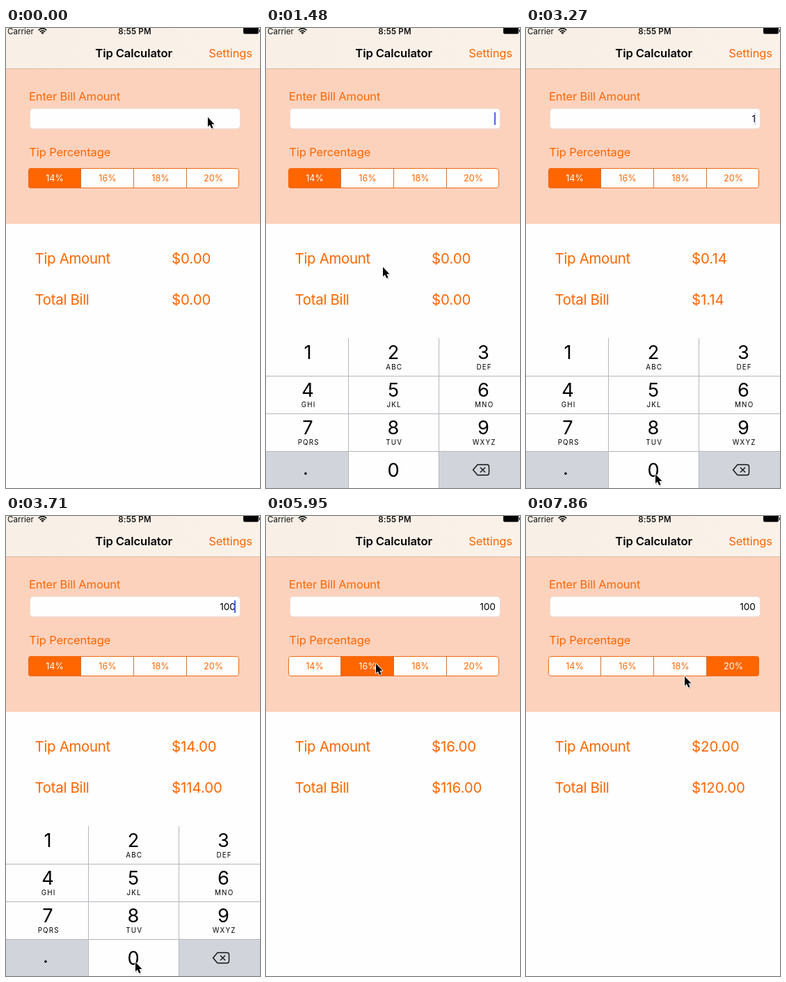
An HTML page for the animation above (8 s loop, 365x660 px).

```html
<!DOCTYPE html>
<html lang="en">
<head>
<meta charset="utf-8">
<title>Tip Calculator</title>
<style>
  html, body { margin: 0; width: 100%; height: 100%; overflow: hidden; background: #fefefe; }
  svg { display: block; }
  text { font-family: Inter, Roboto, sans-serif; white-space: pre; }
  .orange { fill: #ff6600; }
  .status { font-size: 11.6px; fill: #111; }
  .label { font-size: 16.5px; letter-spacing: -.13px; }
  .big { font-size: 20.4px; letter-spacing: -.3px; }
  .amount { font-size: 20.4px; letter-spacing: -.05px; }
  .title { font-size: 16.6px; font-weight: 600; letter-spacing: -.1px; }
  .seg { font-size: 12.6px; }
  .digit { font-size: 27.2px; }
  .abc { font-size: 9.8px; letter-spacing: 1.2px; }
  .mid { text-anchor: middle; }
</style>
</head>
<body>
<svg width="365" height="660" viewBox="0 0 365 660">
  <defs>
    <linearGradient id="bar" x2="1" y2="0">
      <stop offset="0" stop-color="#f8efe7"/>
      <stop offset="1" stop-color="#faf2e9"/>
    </linearGradient>
    <clipPath id="round"><rect x="32" y="201" width="303" height="29" rx="4"/></clipPath>
  </defs>
  <rect width="365" height="660" fill="#fefefe"/>
  <rect y="58" width="365" height="223" fill="#fdd2bd"/>
  <rect width="365" height="58" fill="url(#bar)"/>
  <rect y="58" width="365" height="1" fill="#dfb7a3"/>

  <text class="status" x="2" y="9">Carrier</text>
  <g fill="none" stroke="#111" stroke-width="1.7">
    <path d="M46.6 3.2Q52.5 -2 58.4 3.2M48.7 5.4Q52.5 2.2 56.3 5.4"/>
    <path d="M50.2 6.6Q52.5 5 54.8 6.6L52.5 9Z" fill="#111" stroke="none"/>
  </g>
  <text class="status mid" x="185" y="9" font-weight="600" letter-spacing=".15">8:55 PM</text>
  <path d="M341 0H363V6.5Q363 8.5 361 8.5H343Q341 8.5 341 6.5ZM364 2h1v4h-1Z" fill="#050505"/>

  <text class="title mid" x="183.6" y="42">Tip Calculator</text>
  <text class="label orange" x="291.3" y="42">Settings</text>
  <text class="label orange" x="33" y="103.5">Enter Bill Amount</text>
  <text class="label orange" x="33.3" y="183.5">Tip Percentage</text>

  <rect x="34.5" y="115.5" width="302" height="29" rx="4.5" fill="#fefefe" stroke="#e8dad3"/>
  <text id="bill" x="330" y="134.5" font-size="13.7" text-anchor="end"></text>
  <rect id="caret" x="328" y="121" width="2" height="18" fill="#4a66e6"/>

  <rect x="32" y="201" width="303" height="29" rx="4" fill="#fefefe"/>
  <rect id="pick" y="201" width="76" height="29" class="orange" clip-path="url(#round)"/>
  <rect x="32.5" y="201.5" width="302" height="28" rx="3.5" fill="none" stroke="#f0690f"/>
  <path d="M107.5 201V230M183.5 201V230M259.5 201V230" stroke="#c9743a"/>
  <g id="segs"></g>

  <text class="big orange" x="41.6" y="338">Tip Amount</text>
  <text class="big orange" x="41.6" y="397">Total Bill</text>
  <text id="tip" class="amount orange" x="238" y="338"></text>
  <text id="total" class="amount orange" x="238" y="397"></text>

  <g id="pad">
    <rect y="445" width="365" height="215" fill="#fefefe"/>
    <path d="M0 607H118V660H0ZM248 607H365V660H248Z" fill="#d1d5db"/>
    <rect id="zero" x="118" y="607" width="130" height="53" fill="#d1d5db"/>
    <path d="M0 499.5H365M0 553.5H365M0 607.5H365M118.5 445V660M248.5 445V660" stroke="#b4b6ba"/>
    <g id="keys"></g>
    <path d="M304 626.5H317.5Q320.5 626.5 320.5 629.5V638.5Q320.5 641.5 317.5 641.5H304L297.5 634ZM308 630.5L315 637.5M315 630.5L308 637.5"
      fill="none" stroke="#111" stroke-width="1.4" stroke-linejoin="round"/>
  </g>

  <g id="mouse">
    <path d="M.5 1.5V16L4 13L6 18L9 17L7 12H11Z" fill="#000" opacity=".18"/>
    <path d="M0 0V13.6L3 10.9L5.2 16L7.6 15L5.4 10H9.4Z" stroke="#fff" stroke-width="1.8" paint-order="stroke" stroke-linejoin="round"/>
  </g>
</svg>
<script>
const $ = id => document.getElementById(id);
const set = (id, name, value) => $(id).setAttribute(name, value);
const rates = [14, 16, 18, 20];

function addText(parent, cls, x, y, str) {
  const el = document.createElementNS("http://www.w3.org/2000/svg", "text");
  el.setAttribute("class", cls + " mid");
  el.setAttribute("x", x);
  el.setAttribute("y", y);
  el.textContent = str;
  $(parent).append(el);
  return el;
}

const segs = rates.map((r, i) => addText("segs", "seg", 70 + 76 * i, 220, r + "%"));

const columns = [60, 183, 312.5];
["", "ABC", "DEF", "GHI", "JKL", "MNO", "PQRS", "TUV", "WXYZ"].forEach((abc, i) => {
  const x = columns[i % 3], y = 475 + 54 * Math.floor(i / 3);
  addText("keys", "digit", x, y, i + 1);
  addText("keys", "abc", x + 1.2, y + 15, abc);
});
addText("keys", "digit", 183, 644, "0");
addText("keys", "digit", 57, 641, ".");

// The screen is sampled in ticks; all times below are tick numbers.
const LOOP = 8000, TICKS = 54, BLINK = 6.75;
const open = 3, close = 35;
const typed = [16, 24, 25], taps = [39, 46, 50];

// Pointer moves: start, length, then where it lands.
const moves = [
  [4, 6, 168, 343],   // rest
  [11, 4, 55, 466],   // key 1
  [16, 3, 150, 585],
  [20, 2, 186, 640],  // key 0
  [25, 3, 190, 72],
  [28, 2, 161, 229],
  [36, 3, 158, 212],  // 16%
  [43, 2, 222, 214],  // 18%
  [48, 1, 278, 212],  // 20%
  [50, 3, 228, 230]
];

const clamp = u => Math.min(1, Math.max(0, u));
const ease = u => (u = clamp(u), u * u * (3 - 2 * u));
const passed = (times, k) => times.filter(t => t <= k).length;

function pointer(k) {
  let x = 290, y = 128;
  for (const [start, length, toX, toY] of moves) {
    const s = ease((k - start) / length);
    x += (toX - x) * s;
    y += (toY - y) * s;
  }
  return [Math.round(x), Math.round(y)];
}

// The blink restarts with each typed digit.
function caret(k) {
  if (k <= open || k > close + 1) return 0;
  const last = [open, ...typed].filter(t => t <= k).pop();
  const phase = (k - last) / BLINK % 1;
  return phase < .6 ? 1 : clamp((phase - .85) / .15);
}

function draw(ms) {
  const k = Math.floor((ms % LOOP + 8) * TICKS / LOOP) % TICKS;
  const bill = "100".slice(0, passed(typed, k));
  const pick = passed(taps, k);
  const tip = bill * rates[pick] / 100;
  const padUp = ease((k - open) / 3) - ease((k - close) / 3);
  set("mouse", "transform", `translate(${pointer(k)})`);
  set("pad", "transform", `translate(0 ${Math.round(215 * (1 - padUp))})`);
  set("caret", "opacity", caret(k));
  set("zero", "opacity", typed.slice(1).includes(k + 1) ? 1 : 0);
  set("pick", "x", 32 + 76 * pick);
  $("bill").textContent = bill;
  $("tip").textContent = "$" + tip.toFixed(2);
  $("total").textContent = "$" + (+bill + tip).toFixed(2);
  segs.forEach((el, i) => el.setAttribute("fill", i === pick ? "#fff" : "#ff6600"));
}

const start = performance.now();
function loop(now) {
  draw(Math.max(0, now - start));
  requestAnimationFrame(loop);
}
draw(0);
requestAnimationFrame(loop);
</script>
</body>
</html>
```
